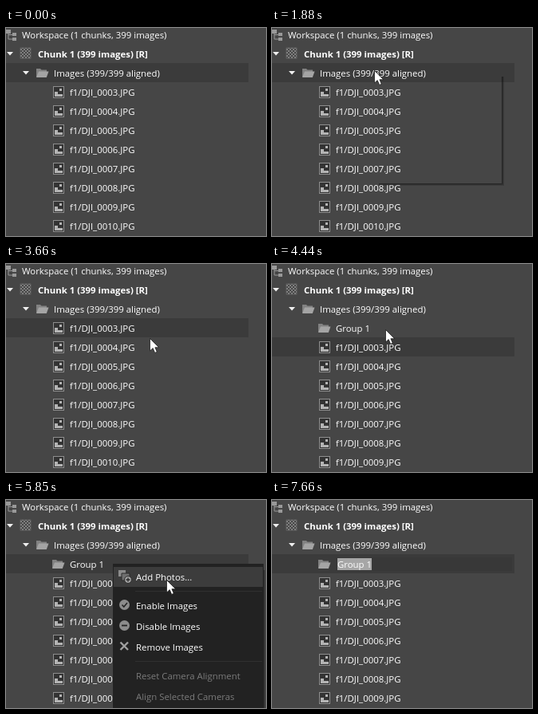
An HTML page that plays this animation: 326x261 px, repeating every 8000 ms.

```html
<!DOCTYPE html>
<html lang="en">
<head>
<meta charset="utf-8">
<title>Adding a camera group</title>
<style>
html, body { margin: 0; width: 100%; height: 100%; overflow: hidden; background: #464646; }
svg { display: block; width: 326px; height: 261px; }
text { font: 11.4px "Open Sans", "Noto Sans", sans-serif; fill: #fff; white-space: pre; }
.bold { font-weight: 700; }
.off { fill: #7b7b7b; }
</style>
</head>
<body>
<svg viewBox="0 0 326 261">
  <defs>
    <path id="arrow" d="M0 0H8L4 4.5Z" fill="#f0f0f0"/>
    <g id="folder">
      <path d="M0 1H5L6.5 2.5H13V11H0Z" fill="#828282"/>
      <path d="M3 4.5H15.5L12.8 12H0Z" fill="#a4a4a4"/>
    </g>
    <g id="photo">
      <rect x=".5" y=".5" width="13" height="14" fill="#333" stroke="#8e8e8e"/>
      <path d="M2 13V7H6V10H12V13Z" fill="#b4b4b4"/>
      <rect x="8" y="3" width="3" height="3" fill="#b4b4b4"/>
    </g>
    <g id="tree" fill="#999">
      <path d="M0 0H6V5H0ZM8 4H13V8H8ZM8 10H13V14H8Z"/>
      <path d="M3 5V12H8M3 6.5H8" fill="none" stroke="#999"/>
    </g>
    <pattern id="checks" width="4" height="4" patternUnits="userSpaceOnUse">
      <path d="M0 0H2V2H0ZM2 2H4V4H2Z" fill="#808080"/>
    </pattern>
    <g id="add">
      <path d="M0 0H9V8H0Z" fill="#8b8b8b"/>
      <path d="M4 4H14V13H4Z" fill="#707070" stroke="#2a2a2a"/>
      <circle cx="12" cy="12" r="4.5" fill="#a0a0a0" stroke="#2a2a2a"/>
      <path d="M9.5 12H14.5M12 9.5V14.5" stroke="#2a2a2a" stroke-width="1.3"/>
    </g>
    <g id="camera">
      <path d="M0 3H3L5 0H10L12 3H14V12H0Z" fill="#858585"/>
      <circle cx="7" cy="7" r="3" fill="#858585" stroke="#222" stroke-width="1.4"/>
      <path d="M8 9H11L12 10H16V15H8Z" fill="#a0a0a0" stroke="#222"/>
    </g>
    <path id="cross" d="M2.5 2.5L12 12M12 2.5L2.5 12" stroke="#a0a0a0" stroke-width="2.4"/>
    <g id="check">
      <circle cx="7.5" cy="7.5" r="6.5" fill="#8c8c8c"/>
      <path d="M4.5 7.5L6.8 10L11 5" fill="none" stroke="#222" stroke-width="1.5"/>
    </g>
    <g id="minus">
      <circle cx="7.5" cy="7.5" r="6.5" fill="#8c8c8c"/>
      <path d="M4 7.5H11" stroke="#222" stroke-width="1.8"/>
    </g>
    <path id="pointer" d="M.5 .5V16L4.2 12.6L6.7 18.4L9.3 17.3L6.9 11.7H11.7Z" fill="#fff" stroke="#111" stroke-width=".7"/>
  </defs>
  <g id="scene"></g>
</svg>
<script>
const LOOP = 8000, STEP = 55, ROW = 24;
const scene = document.getElementById('scene');

// Each move starts where the one before ended; bow bends the path sideways.
const moves = [
  { start: 0, end: 0, x: 232, y: 261 },
  { start: 500, end: 1100, x: 135, y: 30, power: 2 },
  { start: 1340, end: 1640, x: 128, y: 53, bow: -10 },
  { start: 2370, end: 2650, x: 180, y: 93, bow: 14 },
  { start: 4440, end: 4570, x: 134, y: 80, power: 5 },
  { start: 5430, end: 5910, x: 203, y: 101, power: 2 },
  { start: 6280, end: 6400, x: 211, y: 235 }
];

const imagesMenu = {
  x: 128, y: 53, w: 161, h: 143,
  items: [['Add Photos...', 'add'], ['Add Camera Group', 'camera'], ['Remove Cameras', 'cross'],
    '-', ['Sort Cameras'], ['Group by...']]
};
const groupMenu = {
  x: 134, y: 80, w: 189, h: 190,
  items: [['Add Photos...', 'add'], '-', ['Enable Images', 'check'], ['Disable Images', 'minus'],
    ['Remove Images', 'cross'], '-', ['Reset Camera Alignment', '', 'off'], ['Align Selected Cameras', '', 'off']]
};

const within = (t, a, b) => t >= a && t < b;
const rect = (x, y, w, h, fill, more = '') => `<rect x="${x}" y="${y}" width="${w}" height="${h}" fill="${fill}" ${more}/>`;
const label = (x, mid, s, cls = '') => `<text x="${x}" y="${mid + 4.5}" class="${cls}">${s}</text>`;
const icon = (id, x, y) => `<use href="#${id}" x="${x}" y="${y}"/>`;

function pointerAt(t) {
  const i = moves.findLastIndex(m => t >= m.start);
  const to = moves[i], from = moves[Math.max(0, i - 1)];
  const { start, end, power = 1, bow = 0 } = to;
  const u = Math.min(1, (Math.floor((t - start) / STEP) + 1) * STEP / (end - start + STEP));
  const k = 1 - (1 - u) ** power;
  const dx = to.x - from.x, dy = to.y - from.y;
  const side = bow * Math.sin(Math.PI * u) / (Math.hypot(dx, dy) || 1);
  return [Math.round(from.x + dx * k + dy * side), Math.round(from.y + dy * k - dx * side)];
}

function hoverRow(t) {
  if (t < 3600) return 2;
  return within(t, 3720, 4500) ? 4 : 3;
}

function tree(t) {
  const grouped = t >= 3720;
  let s = rect(0, 0, 326, 261, '#464646') + rect(0, hoverRow(t) * ROW - 4, 304, ROW, '#3b3b3b');
  s += icon('tree', 0, 2) + label(20, 8, 'Workspace (1 chunks, 399 images)');
  s += icon('arrow', 1, 30) + rect(18, 25, 13, 13, 'url(#checks)', 'stroke="#777" stroke-width=".6"');
  s += label(40, 32, 'Chunk 1 (399 images) [R]', 'bold');
  s += icon('arrow', 21, 54) + icon('folder', 38, 50) + label(60, 56, 'Images (399/399 aligned)');
  if (grouped) s += icon('folder', 58, 74) + (t < 7660 ? label(80, 80, 'Group 1') : editor());
  for (let i = 0; i < 8 - grouped; i++) {
    const y = 80 + ROW * (i + grouped);
    s += icon('photo', 59, y - 7) + label(80, y, `f1/DJI_${String(i + 3).padStart(4, '0')}.JPG`);
  }
  return s;
}

function editor() {
  return rect(80, 72, 221, 17, '#383838') + rect(82, 73, 43, 15, '#a6a6a6') + label(82, 80, 'Group 1');
}

function shadow(m) {
  const r = m.x + m.w, b = m.y + m.h;
  return [3, 2, 1].map(d =>
    `<path d="M${r + d - 1.5} ${m.y + 8}V${b + d - 1.5}H${m.x + 6}" fill="none" stroke="#000" stroke-opacity="${0.6 - d * 0.15}"/>`
  ).join('');
}

function menu(m, tip, opacity = 1) {
  let s = shadow(m) + rect(m.x, m.y, m.w, m.h, '#222');
  let y = m.y + 16;
  for (const item of m.items) {
    if (item === '-') {
      s += rect(m.x + 28, y - 8, m.w - 30, 1, '#303030');
      y += 10;
      continue;
    }
    const [name, pic, cls] = item;
    if (tip && !cls && tip[0] > m.x && within(tip[1], y - 12, y + 13)) s += rect(m.x + 1, y - 12, m.w - 2, 25, '#3c3c3c');
    if (pic) s += icon(pic, m.x + 7, y - 8);
    s += label(m.x + 29, y, name, cls);
    y += 26;
  }
  return `<g opacity="${opacity}">${s}</g>`;
}

function render(t) {
  const visible = within(t, 500, 2860) || within(t, 3540, 6460);
  const tip = pointerAt(t);
  let s = tree(t);
  if (within(t, 1880, 1940)) s += shadow(imagesMenu);
  if (within(t, 1940, 3540)) s += menu(imagesMenu, tip);
  if (within(t, 3540, 3660)) s += menu(imagesMenu, null, 1 - (t - 3500) / 160);
  if (within(t, 5000, 5140)) s += shadow(groupMenu);
  if (within(t, 5140, 7660)) s += menu(groupMenu, visible && tip);
  if (visible) s += icon('pointer', ...tip);
  return s;
}

let last = '';
function tick() {
  const s = render(performance.now() % LOOP);
  if (s !== last) scene.innerHTML = last = s;
  requestAnimationFrame(tick);
}
tick();
</script>
</body>
</html>
```
